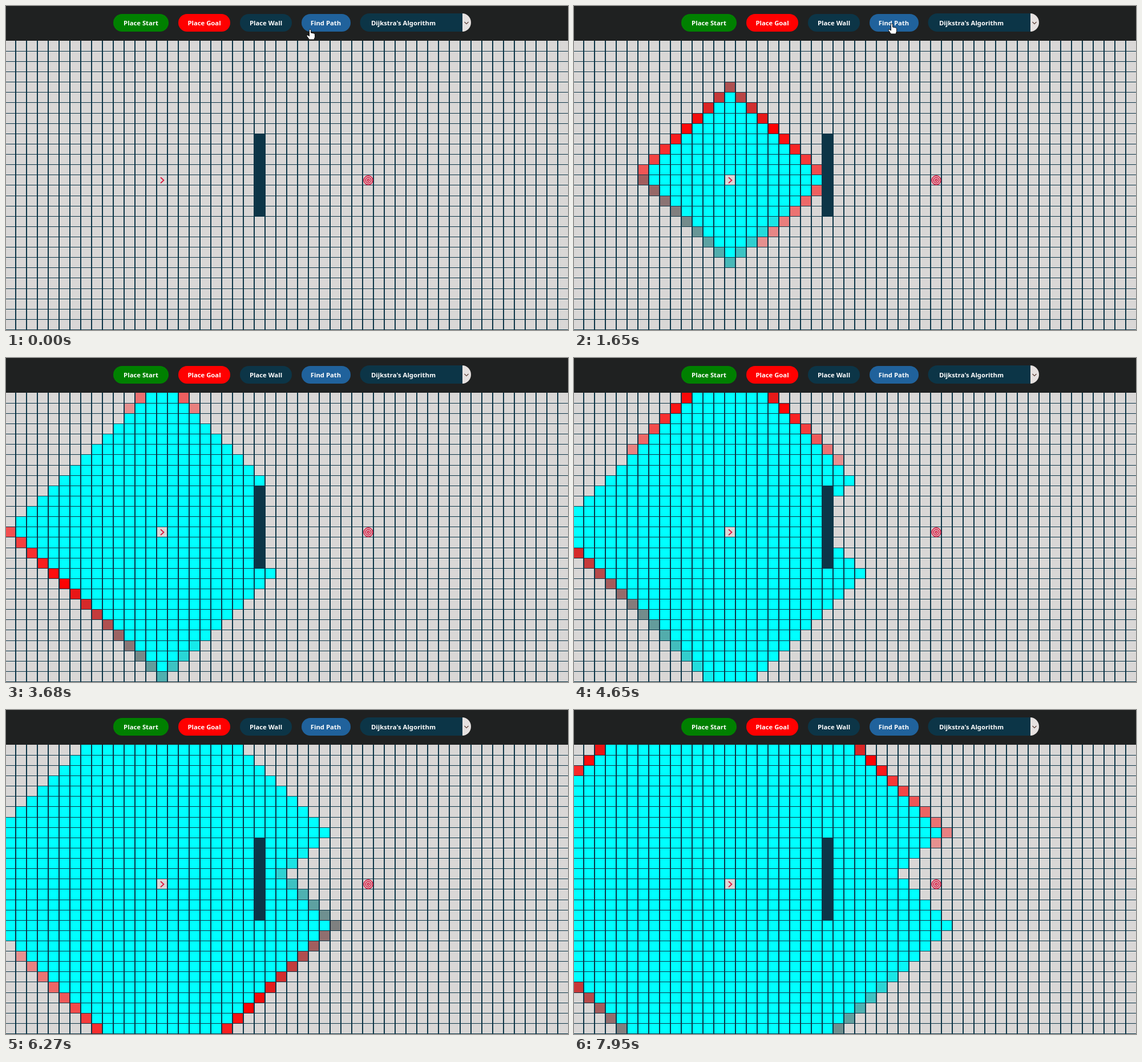
An HTML page with a canvas for the animation above (8000 ms loop, 985 by 569 pixels).

```html
<!DOCTYPE html>
<html lang="en">
<head>
<meta charset="utf-8">
<title>Pathfinding visualizer</title>
<style>
  html, body { margin: 0; width: 100%; height: 100%; overflow: hidden; background: #d9d7d6; }
  canvas, svg { position: absolute; left: 0; top: 0; }
  text { font: bold 11.3px "Noto Sans", "Open Sans", sans-serif; fill: #fff; }
</style>
</head>
<body>
<canvas id="grid" width="985" height="569"></canvas>
<svg width="985" height="569" fill="none">
  <rect width="985" height="61" fill="#1f2121"/>
  <rect x="188" y="14" width="97" height="31" rx="15.5" fill="#008000"/>
  <rect x="302" y="14" width="91" height="31" rx="15.5" fill="#f00"/>
  <rect x="410" y="14" width="91" height="31" rx="15.5" fill="#0c3547"/>
  <rect x="518" y="14" width="86" height="31" rx="15.5" fill="#20629c"/>
  <path d="M800 13H636.500a16 16 0 0 0 0 32H800z" fill="#0c3547"/>
  <path d="M800 13a15 16 0 0 1 0 32z" fill="#e6e1e0"/>
  <path d="M803.500 28l3.500 3.500 3.500-3.500" stroke="#5b4038" stroke-width="1.200"/>
  <g text-anchor="middle">
    <text x="236.500" y="33.500">Place Start</text>
    <text x="347.500" y="33.500">Place Goal</text>
    <text x="455.500" y="33.500">Place Wall</text>
    <text x="560.500" y="33.500">Find Path</text>
    <text x="696.500" y="33.500">Dijkstra's Algorithm</text>
  </g>
  <g stroke="#dc143c" stroke-width="1.700">
    <path d="M271 301l5.500 5-5.500 5"/>
    <circle cx="635" cy="306" r="7.800"/>
    <circle cx="635" cy="306" r="4.800"/>
    <circle cx="635" cy="306" r="1.800"/>
  </g>
  <g fill="#fff" stroke="#111" stroke-width="1" stroke-linejoin="round">
    <path id="hand" d="M-1.500 10V1.500a1.500 1.500 0 0 1 3 0V6l5 1 2 1.500v5L7 18H-1.500L-6 11.500q0-2 2-1.500l2.500 2z"/>
    <path id="arrow" d="M.500.500v14l3.200-3 2.300 5 2-1-2.200-4.800h4.200z"/>
  </g>
</svg>
<script>
const LOOP = 8000, TICK = 65, FADE = 145;
const COLS = 52, ROWS = 28, ROW_TOP = 61;
const START = { col: 14, row: 13 };
const GREY = [217, 215, 214], RED = [255, 0, 0], CYAN = [0, 255, 255], LINE = '#0c3547';

const ctx = document.getElementById('grid').getContext('2d');
const hand = document.getElementById('hand');
const arrow = document.getElementById('arrow');

const colX = c => 19 * c - 2;
const rowY = r => Math.round(60.7 + 18.12 * r);
const isWall = (c, r) => c === 23 && r >= 9 && r <= 16;

// Piecewise linear lookup: keys are rows of [input, output, ...]
function lookup(keys, x, out = 1) {
  let i = 1;
  while (i < keys.length - 1 && x > keys[i][0]) i++;
  const [a, b] = [keys[i - 1], keys[i]];
  const f = Math.max(0, (x - a[0]) / (b[0] - a[0]));
  return a[out] + (b[out] - a[out]) * f;
}

// Number of visited cells against time in ms
const PACE = [[0, 450], [38, 815], [167, 1655], [280, 2500], [296, 2630], [391, 3670],
  [601, 5620], [739, 6920], [844, 7960], [860, 8120]];
const HAND_PATH = [[0, 533, 41], [130, 533, 41], [450, 557, 27], [870, 560, 31],
  [1250, 564, 32], [1600, 557, 31], [2540, 557, 31]];
const ARROW_PATH = [[2540, 570, 42], [2630, 667, 118], [2760, 800, 300], [2900, 918, 570]];

// Breadth-first order: up, right, down, left
function search() {
  const seen = new Set([START.row * COLS + START.col]);
  const queue = [START];
  for (const { col, row } of queue) {
    for (const [dc, dr] of [[0, -1], [1, 0], [0, 1], [-1, 0]]) {
      const c = col + dc, r = row + dr, key = r * COLS + c;
      if (c < 0 || r < 0 || c >= COLS || r >= ROWS || isWall(c, r) || seen.has(key)) continue;
      seen.add(key);
      queue.push({ col: c, row: r, time: lookup(PACE, queue.length) });
    }
  }
  return queue.slice(1);
}
const visits = search();

function mix(a, b, f) {
  return `rgb(${a.map((v, i) => Math.round(v + (b[i] - v) * f))})`;
}

function visitColor(age) {
  const f = age / FADE;
  return f < 1 ? mix(GREY, RED, f) : mix(RED, CYAN, Math.min(1, f - 1));
}

function fillCell(c, r, color) {
  ctx.fillStyle = color;
  ctx.fillRect(colX(c), rowY(r), 19, rowY(r + 1) - rowY(r));
}

function drawGrid(t) {
  ctx.fillStyle = mix(GREY, GREY, 0);
  ctx.fillRect(0, 0, 985, 569);
  for (const { col, row, time } of visits) {
    if (time > t + 0.5) break;
    fillCell(col, row, visitColor(t - time + 48));
  }
  for (let r = 9; r <= 16; r++) fillCell(23, r, LINE);
  ctx.fillStyle = LINE;
  for (let c = 1; c < COLS; c++) ctx.fillRect(colX(c) - 1, ROW_TOP, 2, 508);
  for (let r = 1; r <= ROWS; r++) ctx.fillRect(0, rowY(r), 985, 1);
}

function placeCursor(node, path, t, visible) {
  node.style.display = visible ? '' : 'none';
  const [x, y] = [1, 2].map(i => Math.round(lookup(path, t, i)));
  node.setAttribute('transform', `translate(${x} ${y})`);
}

function frame(now) {
  const t = Math.floor(Math.max(0, now % LOOP - 12) / TICK) * TICK + 30;
  drawGrid(t);
  placeCursor(hand, HAND_PATH, t, t < 2540);
  placeCursor(arrow, ARROW_PATH, t, t >= 2540 && t < 2900);
  requestAnimationFrame(frame);
}
frame(0);
</script>
</body>
</html>
```
